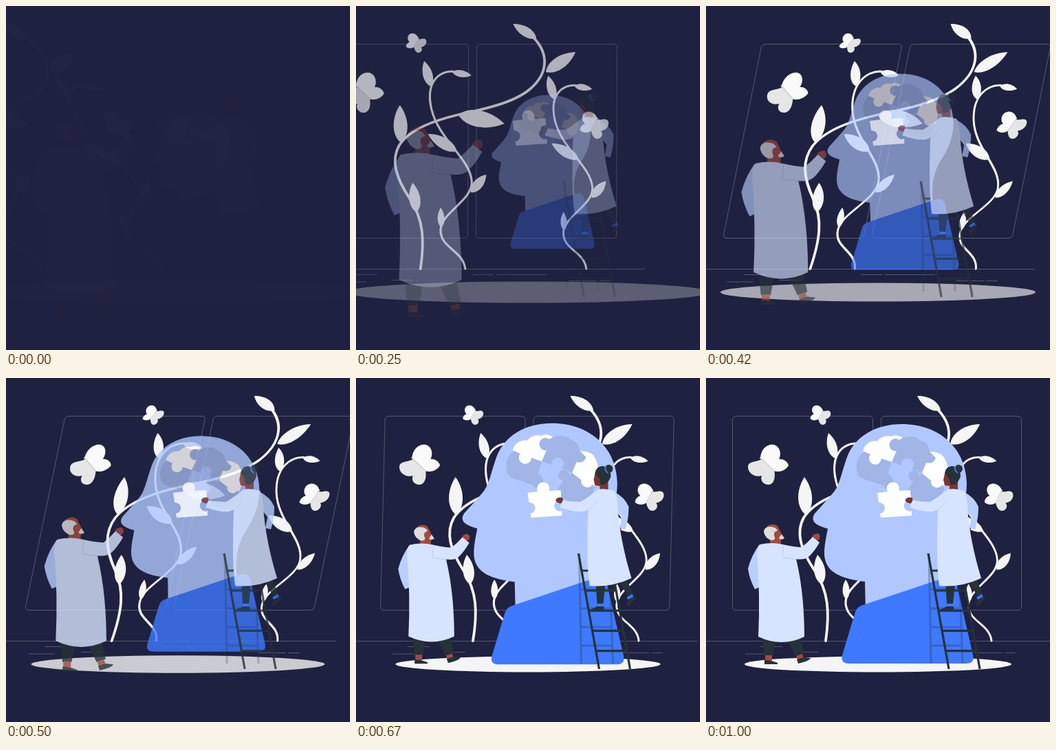
An HTML page that plays this animation: 500x500 px, repeating every 1040 ms.

```html
<!DOCTYPE html>
<html lang="en">
<head>
<meta charset="utf-8">
<title>Head puzzle</title>
<style>
html, body { margin: 0; height: 100%; overflow: hidden; background: #1f2140; }
svg { display: block; width: 100vw; height: 100vh; }
.line { fill: none; stroke: #fff; stroke-opacity: .3; stroke-width: .8; }
.stem { fill: none; stroke: #f5f5f5; stroke-linecap: round; }
.dark { fill: #263238; }
.coat { fill: #d7e4ff; }
.sleeve { fill: #b9cfff; }
.blue { fill: #3f79ff; }
.shade { fill: #a1b5e6; }
.white { fill: #fff; }
.skin { fill: #a5493f; }
.brown { fill: #763535; }
.seam { fill: none; stroke: #aebfe6; stroke-width: .6; }
.rail { fill: none; stroke: #263238; }
</style>
</head>
<body>
<svg viewBox="0 0 500 500">
  <defs>
    <g id="butterfly">
      <path fill="#e6e6e6" d="M-9-7C-18-2-28-5-29 4C-29 14-18 20-9 17C-12 25-5 31 2 30C10 28 11 18 9 8Z"/>
      <path fill="#fafafa" d="M-11-9C-10-22-1-30 9-28C18-25 20-14 16-7C22-8 29-3 30 2C25 11 14 13 6 9Z"/>
      <path stroke="#d6d6d6" stroke-width="2" stroke-linecap="round" d="M-11-9L9 10"/>
    </g>
  </defs>

  <g id="scene">
    <g class="line">
      <rect x="38.5" y="55.5" width="204" height="282" rx="5"/>
      <rect x="254.5" y="55.5" width="204" height="282" rx="5"/>
      <path d="M0 382.5H500M79 390.5H111M250 390.5H280M284 390.5H357M57 401H95M133 398.5H163M390 399.5H431M434 399.5H450"/>
    </g>
    <path class="stem" stroke-width="3.8" d="M174 382C180 340 178 310 158 280C138 250 130 225 142 203C158 178 195 166 228 158C270 149 310 140 333 120C358 98 360 70 337 46"/>
    <g id="tall" fill="#f5f5f5"></g>
    <g id="vine">
      <path class="stem" stroke-width="3.1" d="M239 382C236 355 202 352 203 325C204 300 250 282 248 255C246 222 200 195 189 150C180 112 198 95 220 95"/>
      <g id="small" fill="#f5f5f5"></g>
    </g>
    <use href="#vine" transform="translate(415 382) scale(.93) translate(-239 -382)"/>
    <use href="#butterfly" transform="translate(90 125)"/>
    <use href="#butterfly" transform="translate(166 53) rotate(-20) scale(-.52 .52)"/>
    <use href="#butterfly" transform="translate(425 172) rotate(-20) scale(-.73 .73)"/>
  </g>

  <ellipse id="floor" cx="250" cy="416" rx="194" ry="11.5" fill="#f5f5f5"/>

  <g id="head">
    <path fill="#b0c8ff" d="M285 67C245 67 216 86 205 115C196 140 194 158 183 169Q170 184 158 197Q152 206 160 212Q166 216 177 219C174 235 172 243 172 256C173 284 199 292 231 296L232 340L345 310C338 270 342 245 357 220C372 196 379 178 379 153C378 103 340 67 285 67Z"/>
    <path class="blue" d="M228 330L345 291Q360 286 364 298L388 402Q391 415 378 415H208Q195 415 198 403L217 340Q219 333 228 330Z"/>
    <path class="shade" d="M231 107C217 113 216 136 223 143Q228 148 239 150L257 156A8 8 0 0 0 272 149Q271 143 264 140L270 122L245 106Z"/>
    <path class="white" d="M228 106C231 95 241 90 249 92Q257 82 268 85Q278 81 286 87L270 122L255 117A9 9 0 1 1 239 111Z"/>
    <path class="shade" d="M286 87Q302 82 312 91Q324 94 324 106Q335 107 334 116Q331 125 320 123L313 138L299 132A9 9 0 1 0 284 127L270 122L277 106A9 9 0 1 1 281 90Z"/>
    <path class="white" d="M325 107Q345 107 349 122Q356 139 346 157L342 155A9 9 0 1 1 327 149L313 142L320 123Q331 126 334 116Z"/>
    <path class="shade" d="M313 138L327 149A9 9 0 0 0 342 157L346 159Q342 181 319 182Q300 179 292 164L301 150A8 8 0 1 1 309 146Z"/>
  </g>

  <g id="man">
    <path class="dark" d="M82 376H102L97 404H85ZM118 379L137 375L142 400L130 404Z"/>
    <path class="skin" d="M86 403H96V411H86ZM131 404L140 401L142 407L133 410Z"/>
    <path class="dark" d="M85 410L95 411L104 414V416H85ZM132 409L142 406L152 407Q151 411 134 415Z"/>
    <path class="sleeve" d="M77 243Q66 258 61 277Q63 292 71 307L78 304V270Z"/>
    <path class="skin" d="M94 232L109 233V242H92ZM154 232Q155 226 163 226Q168 230 164 235L159 237Z"/>
    <path class="skin" d="M88 216Q96 210 104 215L111 229Q111 238 104 240Q92 239 88 229Z"/>
    <path fill="#ddd" d="M84 224Q84 217 92 216Q102 216 104 222Q98 223 99 229Q103 236 95 236Q86 233 84 224ZM107 231L110 227L114 233Q109 236 106 233Z"/>
    <path class="dark" d="M92 239Q102 244 112 241V244H91Z"/>
    <path class="coat" d="M78 242Q95 238 112 242Q130 246 139 246Q147 240 155 231L165 239Q157 253 149 260Q142 265 131 263C140 300 143 340 143 376Q110 392 76 376Q79 315 74 258Q74 245 78 242Z"/>
    <path class="seam" d="M113 243L111 261L133 264"/>
  </g>

  <g id="woman">
    <g class="rail" stroke-width="3" stroke-opacity=".3">
      <path d="M324 256L327 415M369 305L373 415M325 307H369M326 335H370M326 362H372M327 389H373"/>
    </g>
    <path id="ladder" class="rail" stroke-width="3.2"/>
    <path class="white" d="M249 167L264 165A9 9 0 1 1 280 164L297 163L298 178A8 8 0 1 0 299 193V200L254 203L253 197A8 8 0 1 0 251 181Z"/>
    <path class="dark" d="M348 298H362L359 328H350ZM382 296L392 290L402 314L395 318Z"/>
    <path class="blue" d="M350 328H359V332H350ZM393 319L401 314L403 318L395 322Z"/>
    <path class="dark" d="M342 336L350 332H360V337H342ZM395 323L405 317L406 321L395 332L393 329Z"/>
    <path class="brown" d="M380 214L386 217L383 224L379 222ZM290 177Q292 172 300 174L301 181Q294 184 290 179Z"/>
    <path class="sleeve" d="M374 165Q390 173 396 187Q396 205 391 220L383 218L386 202L378 192Z"/>
    <path class="brown" d="M347 139L345 148L347 156L354 157V164H366V146Z"/>
    <path class="dark" d="M347 138Q349 128 358 128Q370 130 370 143Q366 155 358 155Q354 156 354 149Q353 142 347 140Z"/>
    <circle class="dark" cx="367" cy="132" r="6"/>
    <path fill="none" stroke="#3f79ff" stroke-width="2" d="M363 128Q359 133 366 138"/>
    <path class="coat" d="M351 162Q363 160 375 164Q379 169 380 188Q383 235 400 291Q370 305 339 302Q334 268 337 191Q327 199 296 188L300 178Q314 180 326 180Q338 173 351 162Z"/>
    <path class="seam" d="M337 192L350 179"/>
  </g>
</svg>
<script>
const $ = id => document.getElementById(id);

// A leaf runs from base to tip with the given half width.
function leaf(x, y, tx, ty, half) {
  const dx = tx - x, dy = ty - y, k = half / .75 / Math.hypot(dx, dy);
  const at = (f, side) => `${x + dx * f - dy * k * side} ${y + dy * f + dx * k * side}`;
  return `<path d="M${x} ${y}C${at(.2, 1)} ${at(.65, 1)} ${tx} ${ty}C${at(.65, -1)} ${at(.2, -1)} ${x} ${y}"/>`;
}
const leaves = list => list.map(a => leaf(...a)).join('');

$('tall').innerHTML = leaves([
  [145, 199, 143, 144, 10], [168, 300, 162, 257, 8], [341, 47, 307, 26, 7],
  [355, 96, 398, 67, 9], [228, 158, 295, 171, 12]
]);
$('small').innerHTML = leaves([
  [188, 117, 178, 80, 7], [219, 96, 247, 101, 5], [226, 211, 184, 186, 8],
  [247, 271, 269, 245, 7], [204, 322, 203, 293, 5]
]);

let rungs = 'M323 255L353 423M376 300L398 423M328 280H340';
for (let y = 309; y < 400; y += 29.2) rungs += `M${323 + .179 * (y - 255)} ${y}h45`;
$('ladder').setAttribute('d', rungs);

// cubic-bezier(.36, -.01, .5, 1.38)
function ease(x) {
  if (x <= 0) return 0;
  if (x >= 1) return 1;
  const curve = (s, a, b) => 3 * s * (1 - s) * (a * (1 - s) + b * s) + s ** 3;
  let lo = 0, hi = 1;
  for (let i = 0; i < 30; i++) {
    const mid = (lo + hi) / 2;
    if (curve(mid, .36, .5) < x) lo = mid; else hi = mid;
  }
  return curve(lo, -.01, 1.38);
}

function pose(id, transform, opacity) {
  $(id).setAttribute('transform', transform);
  $(id).setAttribute('opacity', Math.max(0, Math.min(1, opacity)));
}
const zoom = (x, y, s) => `translate(${x} ${y}) scale(${s}) translate(${-x} ${-y})`;

function draw(t) {
  const enter = ease(t / .6), p = ease(t);
  const skew = t < .6 ? .364 - .54 * enter
    : t < .8 ? -.176 + .211 * ease((t - .6) / .2)
    : .035 * (1 - ease((t - .8) / .2));
  const shift = -250 * (1 - enter) - skew * 213;
  const shrink = 1.5 - .5 * p;
  pose('scene', `matrix(1 0 ${skew} 1 ${shift} 0)`, enter);
  pose('floor', zoom(250, 416, shrink), p);
  pose('head', zoom(272, 241, .5 + .5 * p), p);
  pose('man', zoom(113.5, 314.5, shrink), p);
  pose('woman', `translate(${-30 * (1 - p)} 0)`, p);
}

// 24 steps a second; the first pose is held for two steps.
function tick() {
  const step = Math.floor(performance.now() % 1040 * .024 + .15);
  draw(Math.min(1, (step < 2 ? 0 : step) / 24 + .031));
  requestAnimationFrame(tick);
}
tick();
</script>
</body>
</html>
```
